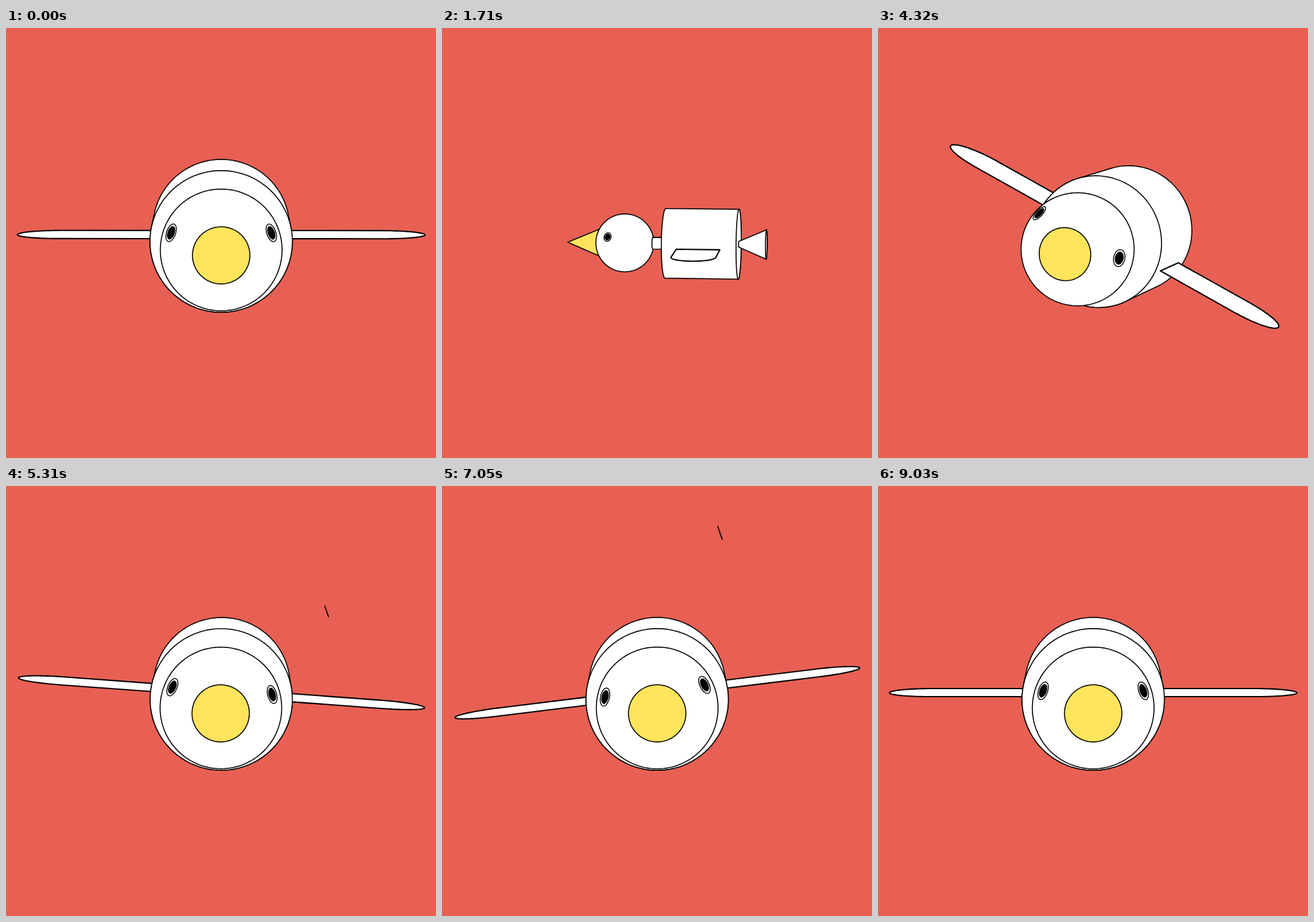
An HTML page for the animation above (9.06 s loop, 690x690 px).

```html
<!DOCTYPE html>
<html lang="en">
<head>
<meta charset="utf-8">
<title>Flying bird</title>
<style>
  html, body { margin: 0; width: 100%; height: 100%; overflow: hidden; background: #e76053; }
  svg { display: block; width: 100vw; height: 100vh; }
  path { stroke: #000; stroke-linejoin: round; }
</style>
</head>
<body>
<svg id="stage" viewBox="0 0 690 690"></svg>
<script>
const LOOP = 9060;
const HALF_SWAY = 1806;
const MAX_ROLL = 30;
const DISTANCE = 50;            // camera distance in body radii
const PITCH = 5.6 * Math.PI / 180;
const CENTER = { x: 345.3, y: 345.4 };
const FRONT = -0.24, BACK = -2.35;   // ends of the body cylinder
const WHITE = '#fff', YELLOW = '#ffe45c', BLACK = '#000';
const { sin, cos, PI, hypot } = Math;

// time, yaw in degrees, slope in degrees per ms
const YAW_KEYS = [
  [0, 0, 0], [906, 100, 0], [1710, 97, -0.018],
  [3180, 47.4, -0.0318], [4320, 14.2, -0.021], [5436, 0, 0], [LOOP, 0, 0]
];

// Wind streaks: time of passing, side offset, height, length, first visible depth
const STREAKS = [
  [700, 1.5, 0.3, 2.5, -20], [1250, 1.6, 0.6, 2.5, -20],
  [2150, -1.6, 0.9, 2.5, -20], [2560, 1.5, -0.6, 3, -20],
  [2930, 1.7, 0.8, 2.5, -12], [3560, -1.6, 0.4, 2.5, -12],
  [3960, 1.8, -0.5, 2.5, -14], [4760, -1.9, 0.5, 2.5, -20],
  [5393, 1.69, 0.64, 2.4, -26], [6300, -1.5, 1.2, 4, -70],
  [7293, 1.3, 1.12, 5.3, -60], [8130, -1.2, 1.1, 4, -65]
];
const STREAK_SPEED = 0.09;

const stage = document.getElementById('stage');
let yaw, roll, scale, markup;

function yawAt(t) {
  let i = 0;
  while (t >= YAW_KEYS[i + 1][0]) i++;
  const [t0, a, ma] = YAW_KEYS[i], [t1, b, mb] = YAW_KEYS[i + 1];
  const h = t1 - t0, u = (t - t0) / h, v = 1 - u;
  return a * (1 + 2 * u) * v * v + ma * h * u * v * v
       + b * u * u * (3 - 2 * u) - mb * h * u * u * v;
}

// Sways to alternating sides; each swing leaves the level steadily and eases into its peak
function rollAt(t) {
  const swing = Math.min(t / HALF_SWAY, 5);
  const side = Math.floor(swing) % 2 ? -1 : 1;
  const u = 1 - Math.abs(2 * (swing % 1) - 1);
  return side * MAX_ROLL * u * (1.1 + 0.8 * u - 0.9 * u * u);
}

// Roll around the body axis; positive lowers the wing on the right
const rolled = ([x, y, z]) =>
  [x * cos(roll) + y * sin(roll), y * cos(roll) - x * sin(roll), z];

function toView([x, y, z]) {
  const vx = x * cos(yaw) - z * sin(yaw), vz = x * sin(yaw) + z * cos(yaw);
  return [vx, y * cos(PITCH) - vz * sin(PITCH), vz * cos(PITCH) + y * sin(PITCH)];
}

function project(point) {
  const [x, y, z] = toView(point);
  const k = scale * DISTANCE / (DISTANCE - z);
  return [CENTER.x + k * x, CENTER.y - k * y, k];
}

function facesCamera(point, normal) {
  const p = toView(point), n = toView(normal);
  return -p[0] * n[0] - p[1] * n[1] + (DISTANCE - p[2]) * n[2] > 0;
}

function ring(z, r, count = 90) {
  return Array.from({ length: count }, (_, i) => {
    const a = 2 * PI * i / count;
    return project([r * cos(a), r * sin(a), z]);
  });
}

function hull(points) {
  const sorted = points.slice().sort((a, b) => a[0] - b[0] || a[1] - b[1]);
  const half = list => {
    const out = [];
    for (const p of list) {
      while (out.length > 1) {
        const a = out[out.length - 2], b = out[out.length - 1];
        if ((b[0] - a[0]) * (p[1] - a[1]) - (b[1] - a[1]) * (p[0] - a[0]) > 0) break;
        out.pop();
      }
      out.push(p);
    }
    return out.slice(0, -1);
  };
  return half(sorted).concat(half(sorted.reverse()));
}

function draw(points, fill, width = 1.6) {
  const d = points.map(p => p[0].toFixed(2) + ' ' + p[1].toFixed(2)).join('L');
  markup += `<path d="M${d}Z" fill="${fill}" stroke-width="${width}"/>`;
}

const frustum = (z0, r0, z1, r1, fill = WHITE) =>
  draw(hull(ring(z0, r0).concat(ring(z1, r1))), fill);

function cap(z, r, direction) {
  if (facesCamera([0, 0, z], [0, 0, direction])) draw(ring(z, r), WHITE);
}

function wing(side) {
  const root = 1, tip = 2.92, half = 0.615, middle = -1.28;
  const points = [[root, half], [tip - half, half]];
  for (let i = 1; i < 40; i++) {
    const a = PI / 2 - PI * i / 40;
    points.push([tip - half + half * cos(a), half * sin(a)]);
  }
  points.push([tip - half, -half], [root, -half]);
  draw(points.map(([x, z]) => project(rolled([side * x, 0, middle + z]))), WHITE, 2.1);
}

function eye(side) {
  const n = [side * 0.816, 0.328, 0.476];
  const center = n.map((v, i) => v * 0.835 + (i === 2 ? 0.94 : 0));
  if (!facesCamera(rolled(center), rolled(n))) return;
  const flat = hypot(n[0], n[2]);
  const u = [n[2] / flat, 0, -n[0] / flat];
  const v = [-n[1] * n[0] / flat, flat, -n[1] * n[2] / flat];
  const disc = r => Array.from({ length: 40 }, (_, i) => {
    const a = PI * i / 20;
    return project(rolled(center.map((c, j) => c + r * (u[j] * cos(a) + v[j] * sin(a)))));
  });
  draw(disc(0.125), WHITE, 1.4);
  draw(disc(0.092), BLACK, 0.8);
}

function head() {
  const [x, y, k] = project([0, 0, 0.94]);
  draw(Array.from({ length: 120 }, (_, i) => {
    const a = PI * i / 60;
    return [x + 0.835 * k * cos(a), y + 0.835 * k * sin(a)];
  }), WHITE);
  eye(-1);
  eye(1);
}

const beak = () => frustum(1.68, 0.388, 2.61, 0, YELLOW);
const neck = () => frustum(FRONT, 0.17, 0.13, 0.17);
const tail = () => frustum(-3.14, 0.42, BACK, 0.08);

function body() {
  frustum(FRONT, 1, BACK, 1);
  wing(1);
  cap(FRONT, 1, 1);
  cap(BACK, 1, -1);
}

function streaks(t, inFront) {
  for (const [passing, x, y, length, first] of STREAKS) {
    const z = (t - passing) * STREAK_SPEED;
    if (z < first || z > 26) continue;
    const near = toView([x, y, z])[2] > 0;
    if (near === inFront) draw([project([x, y, z - length]), project([x, y, z])], 'none', 1.7);
  }
}

function render(t) {
  const degrees = yawAt(t);
  yaw = degrees * PI / 180;
  roll = rollAt(t) * PI / 180;
  scale = 114.8 - 0.57 * degrees - 0.0004 * degrees * degrees;
  markup = '';
  streaks(t, false);
  wing(-1);
  if (degrees < 90) {
    tail(); body(); neck(); head(); beak();
  } else {
    beak(); head(); neck(); body(); tail();
    cap(-3.14, 0.42, -1);
  }
  streaks(t, true);
  stage.innerHTML = markup;
}

const start = performance.now();
function tick() {
  render((performance.now() - start) % LOOP);
  requestAnimationFrame(tick);
}
tick();
</script>
</body>
</html>
```
